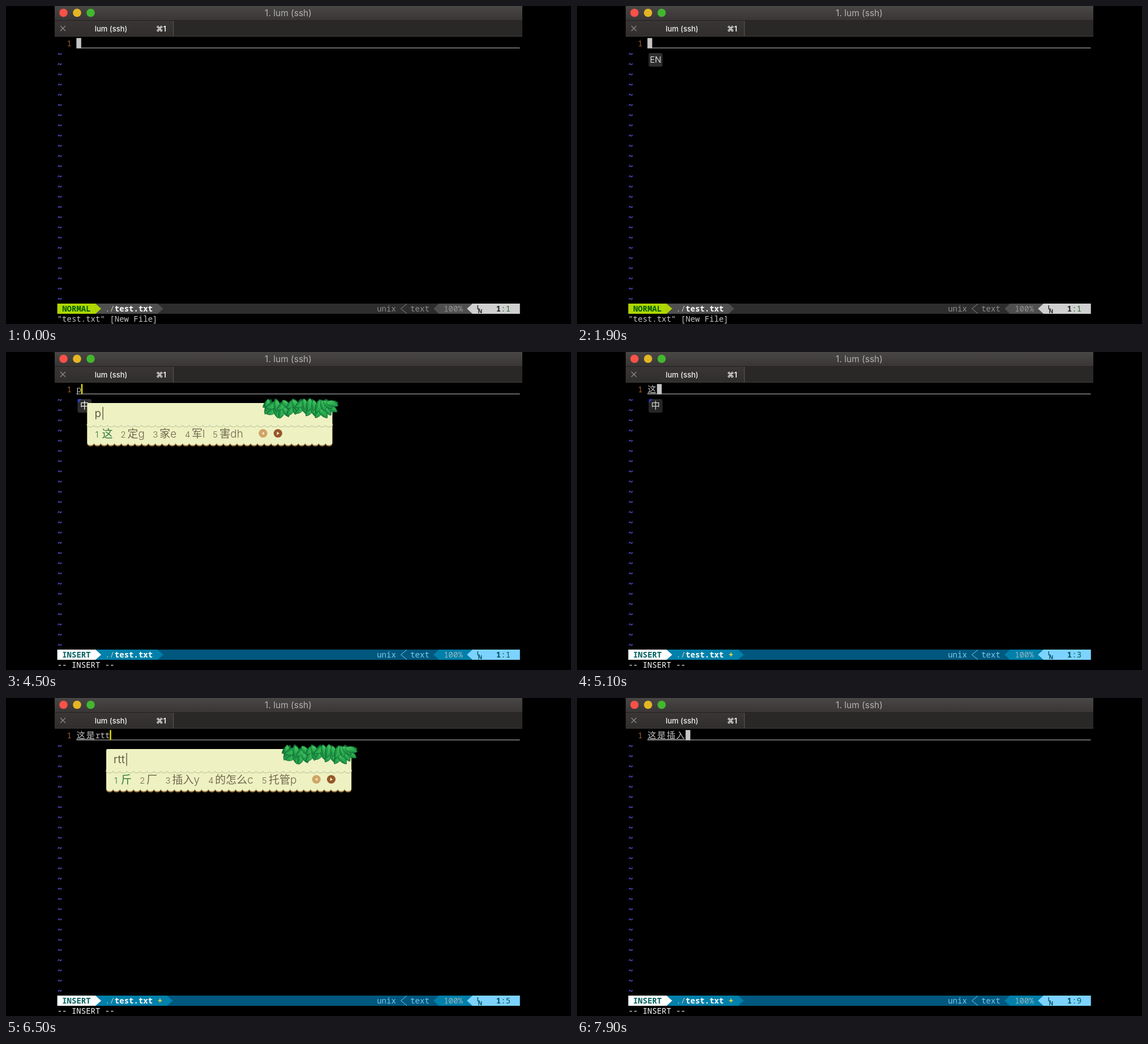
These frames come from a looping animation (998 px wide and 561 px high, 8000 ms). An HTML page:

```html
<!DOCTYPE html>
<html lang="zh-CN">
<head>
<meta charset="utf-8">
<style>
html, body { margin: 0; width: 100%; height: 100%; overflow: hidden; background: #000; }
svg { display: block; width: 998px; height: 561px; }
text { white-space: pre; }
.mono { font: 14.04px "Noto Sans Mono", "Noto Sans CJK SC", "Noto Sans CJK", monospace; }
.ui { font-family: Inter, "Noto Sans CJK SC", "Noto Sans CJK", sans-serif; }
.medium { font-weight: 500; }
.bold { font-weight: 700; }
</style>
</head>
<body>
<svg viewBox="0 0 998 561">
  <defs>
    <linearGradient id="title" x2="0" y2="1">
      <stop stop-color="#494745"/><stop offset="1" stop-color="#383534"/>
    </linearGradient>
    <linearGradient id="tab" x2="0" y2="1">
      <stop stop-color="#393635"/><stop offset="1" stop-color="#302e2d"/>
    </linearGradient>
    <linearGradient id="leaf" x2="1" y2="1">
      <stop stop-color="#5fd66f"/><stop offset=".5" stop-color="#25a84c"/><stop offset="1" stop-color="#0d7034"/>
    </linearGradient>
    <g id="foliage"></g>
  </defs>
  <rect width="998" height="561"/>
  <g id="window"></g>
  <g id="status"></g>
  <g id="line"></g>
  <g id="badge"></g>
  <g id="panel"></g>
</svg>
<script>
const LOOP = 8000, LEFT = 90.7, CELL = 8.425, ROW = 18;
const $ = id => document.getElementById(id);
const col = n => LEFT + n * CELL;
const rect = (x, y, w, h, fill, more = '') =>
  `<rect x="${x}" y="${y}" width="${w}" height="${h}" fill="${fill}" ${more}/>`;
const path = (d, fill, more = '') => `<path d="${d}" fill="${fill}" ${more}/>`;
const circle = (x, y, r, fill) => `<circle cx="${x}" cy="${y}" r="${r}" fill="${fill}"/>`;
const text = (x, y, s, fill, cls = 'mono', more = '') =>
  `<text x="${x}" y="${y}" fill="${fill}" class="${cls}" ${more}>${s}</text>`;

// Text state: [from, committed, being typed]
const edits = [
  [0, '', ''], [1640, '', 'i'], [1900, '', ''],
  [4500, '', 'p'], [4770, '这', ''],
  [5300, '这', 'j'], [5500, '这是', ''],
  [6100, '这是', 'r'], [6300, '这是', 'rt'], [6440, '这是', 'rtt'],
  [6640, '这是', 'rtty'], [6970, '这是', ''], [7100, '这是插入', ''],
  [7240, '这是插入', 'u'], [7440, '这是插入', 'ud'], [7570, '这是插入', 'udd'],
  [7700, '这是插入', 'uddy'], [7900, '这是插入', '']
];
const choices = {
  i: '不 水i 光q 小h 当iv',
  p: '这 定g 家e 军l 害dh',
  j: '是 早h 时f 明e 电n',
  r: '的 年h 手t 后g 找a',
  rt: '后 手 持f 插入ty 托管tp',
  rtt: '斤 厂 插入y 的怎么c 托管p',
  rtty: '插入 抵挡u 挂失 播种k 扩散ft',
  u: '产 亲su 交qu 前ejj 半fk',
  ud: '状 关 头i 状态dy 美u',
  udd: '状 状态y 养j 着h 差a',
  uddy: '状态 美妙 关头'
};
// Badges: [from, fade start, label]; each fades over FADE ms
const FADE = 800;
const badges = [[500, 1040, '中'], [1900, 2440, 'EN'], [3240, 4970, '中']];

const normal = {
  name: 'NORMAL', a: '#afd700', aText: '#005f00', b: '#4f4f4f', strip: '#2d2d2d',
  info: '#8c8c8c', pct: '#949494', end: '#d0d0d0', pos: '#202020', colon: '#2f6b38',
  cmd: '"test.txt" [New File]', cmdText: '#c4c4c4'
};
const insert = {
  name: 'INSERT', a: '#ffffff', aText: '#005f5f', b: '#0080aa', strip: '#00587f',
  info: '#7cc8ea', pct: '#9cb4be', end: '#7dd3ff', pos: '#005060', colon: '#005a50',
  cmd: '-- INSERT --', cmdText: '#ffffff'
};

function drawWindow() {
  let s = rect(86, 0, 826, 26, 'url(#title)') + rect(86, 25.5, 826, 28.5, '#2a2827') +
    rect(86, 26, 209.5, 28, 'url(#tab)') + rect(295, 26, 1.2, 28, '#56524f') +
    rect(86, 25, 826, 1, '#232120') + rect(86, 53, 826, 1, '#3f3d3b');
  ['#fb5149', '#e5b624', '#43b72f'].forEach((c, i) => s += circle(101.5 + 24 * i, 12, 7.3, c));
  s += text(498.5, 18, '1. lum (ssh)', '#b4b2b1', 'ui', 'font-size="15.5" text-anchor="middle"') +
    text(185.5, 44.5, 'lum (ssh)', '#f4f4f4', 'ui', 'font-size="13" font-weight="500" text-anchor="middle"') +
    text(274, 44.5, '⌘1', '#f4f4f4', 'ui', 'font-size="13" font-weight="600" text-anchor="middle"') +
    path('M96 35l9 9m0-9l-9 9', 'none', 'stroke="#92908f" stroke-width="1.1"') +
    text(col(2), 71, '1', '#a5602f');
  for (let i = 1; i <= 25; i++) s += text(col(0), 71.5 + ROW * i, '~', '#6464ff', 'mono bold');
  $('window').innerHTML = s;
}

// Three overlapping rows of leaves: dark back, hanging middle, bright top
function drawFoliage() {
  let seed = 7, s = '';
  const rnd = () => (seed = seed * 16807 % 2147483647) / 2147483647;
  const shape = 'M-11 0C-6-8 5-8 11 0C5 6-6 6-11 0Z';
  for (let row = 0; row < 3; row++) {
    for (let i = 0; i < 15; i++) {
      const x = -115 + i * 8.2, droop = Math.cos((x + 90) * Math.PI / 35);
      const y = [93, 103, 93.5][row] + droop * (row === 1 ? 4 : 1) + rnd() * 3 - 1.5;
      const turn = 95 + (i % 2 ? 28 : -28) + rnd() * 50 - 25 + (i < 2 ? 50 : i > 12 ? -65 : 0);
      const at = `transform="translate(${x} ${y}) rotate(${turn}) scale(${.88 + rnd() * .2})"`;
      s += `<g ${at}>` + path(shape, row ? 'url(#leaf)' : '#0f7336', 'stroke="#0b6130" stroke-width=".7"') +
        path('M-8 0Q0-1.5 9 0', 'none', 'stroke="#8be08c" stroke-width=".6" opacity=".6"') + '</g>';
    }
  }
  $('foliage').innerHTML = s;
}

function drawStatus(m, changed, pos) {
  const y = 525, h = 18, mid = y + h / 2, base = 539.3;
  const right = (x, w, fill) => path(`M${x} ${y}l${w} ${h / 2}l${-w} ${h / 2}z`, fill);
  const left = (x, w, fill) => path(`M${x} ${y}l${-w} ${h / 2}l${w} ${h / 2}z`, fill);
  const edge = col(changed ? 23 : 21);
  $('status').innerHTML =
    rect(LEFT, y, 817, h, m.strip) +
    rect(LEFT, y, edge - LEFT + .5, h, m.b) + right(edge, 10.2, m.b) +
    rect(LEFT, y, col(8) - LEFT + .3, h, m.a) + right(col(8), 10, m.a) +
    text(col(1), base, m.name, m.aText, 'mono bold') +
    text(col(10), base, './', '#c4c4c4') +
    text(col(12), base, 'test.txt', '#fff', 'mono bold') +
    (changed ? text(col(21), base, '+', '#ffe030', 'mono bold') : '') +
    text(col(67), base, 'unix', m.info) +
    path(`M708 ${y + .5}L697.5 ${mid}L708 ${y + h - .5}`, 'none', `stroke="${m.info}" stroke-width="1"`) +
    text(col(74), base, 'text', m.info) +
    left(764.8, 9.5, m.b) + rect(764.5, y, 60, h, m.b) +
    text(col(81), base, '100%', m.pct) +
    left(824, 9.8, m.end) + rect(823.7, y, 84, h, m.end) +
    text(832, 534.5, 'L', m.pos, 'ui bold', 'font-size="9.5"') +
    text(833.7, 542, 'N', m.pos, 'ui bold', 'font-size="9.5"') +
    text(col(92), base, '1', m.pos, 'mono bold') +
    text(col(93), base, ':' + pos, m.colon, 'mono medium') +
    text(col(0), 557.3, m.cmd, m.cmdText, 'mono medium');
}

function drawLine(done, typed) {
  const start = col(4 + done.length * 2), end = start + typed.length * CELL;
  const rule = typed[0] === 'u' ? '#8585ad' : '#a8a8a8';
  let s = rect(col(4), 73.4, 783.2, 1.2, rule);
  [...done].forEach((c, i) => s += text(col(4 + 2 * i) + .4, 71.3, c, '#c4c4c4', 'mono', 'style="font-size:15px"'));
  if (done) s += rect(col(4), 72.5, done.length * 2 * CELL - 2, 1, '#a8a8a8');
  s += typed
    ? text(start, 71, typed, '#c4c4c4') + rect(end, 56.5, 2.4, 17.5, '#e8e400')
    : rect(start, 56.5, 8.4, 18, '#c6c6c6');
  $('line').innerHTML = s;
}

function drawBadge(label) {
  const zh = label === '中';
  $('badge').innerHTML = !label ? '' :
    rect(126.5, 83, 24.5, 24, '#2e2e2e', 'rx="3"') +
    (zh ? path('M127 89.5V85q0-2 2-2h4.5z', '#3442dc') : '') +
    text(138.8, 100.3, label, '#fff', 'ui', `font-size="${zh ? 15.5 : 15}" font-weight="${zh ? 400 : 300}" text-anchor="middle"`);
}

const glyphWidth = c => c > 'z' ? 19 : 'ijlft'.includes(c) ? 4 : c === 's' ? 8 : 11.5;
const wordWidth = w => [...w].reduce((sum, c) => sum + glyphWidth(c), 0);

function scallops(width, depth) {
  const n = Math.round(width / 12), step = width / n;
  return `a${step / 2} ${depth} 0 0 1 ${-step} 0`.repeat(n);
}

function drawPanel(done, typed) {
  if (!typed) { $('panel').innerHTML = ''; return; }
  const gap = 13.7, r = 3;
  let x = 14, words = '';
  choices[typed].split(' ').forEach((word, i) => {
    const c = i ? '#70694f' : '#2d7b3c';
    words += text(x, 151, i + 1, c, 'ui', 'font-size="15" font-weight="300"') +
      text(x + 12, 151, word, c, 'ui', 'font-size="19" font-weight="300"');
    x += 12.5 + wordWidth(word) + gap;
  });
  const end = x - gap, w = Math.max(433, end + 96), prev = end + 34.3;
  const body = y => `M0 ${90 + r}q0 ${-r} ${r} ${-r}H${w - r}q${r} 0 ${r} ${r}V${y}${scallops(w, 4)}z`;
  $('panel').innerHTML = `<g transform="translate(${col(4 + done.length * 2) + 19})">` +
    path(body(162.5), '#94713d') + path(body(160.5), '#eef1c2') +
    path(`M${w} 128${scallops(w, 4)}`, 'none', 'stroke="#d0d6a4" stroke-width="2.2"') +
    path(`M${w} 126.5${scallops(w, 4)}`, 'none', 'stroke="#f7f9da" stroke-width="1"') +
    text(13, 114.5, typed + '|', '#625e49', 'ui', 'font-size="19" font-weight="400"') +
    words +
    circle(prev, 143.5, 7.6, '#cfa366') + path(`M${prev + 2} 140.5v6l-4.5-3z`, '#f3e3bd') +
    circle(prev + 26.3, 143.5, 7.6, '#96562a') + path(`M${prev + 24.5} 140.5v6l4.5-3z`, '#f6e8c8') +
    `<use href="#foliage" x="${w}"/></g>`;
}

let last = '';
function render(t) {
  const [, done, typed] = edits.findLast(e => e[0] <= t);
  const [, fadeAt, label] = badges.findLast(b => b[0] <= t) || [0, 0, ''];
  const step = Math.floor((t - fadeAt) / (FADE / 12)) + 1;
  const alpha = t < fadeAt ? 1 : Math.max(0, 1 - step / 13);
  const mode = t < 2100 ? normal : insert;
  const key = [mode.name, done, typed, label].join();
  if (key !== last) {
    drawStatus(mode, done !== '', done.length * 2 + 1);
    drawLine(done, typed);
    drawBadge(label);
    drawPanel(done, typed);
    last = key;
  }
  $('badge').setAttribute('opacity', alpha);
}

drawWindow();
drawFoliage();
const began = performance.now();
function tick() {
  render((performance.now() - began) % LOOP);
  requestAnimationFrame(tick);
}
tick();
</script>
</body>
</html>
```
